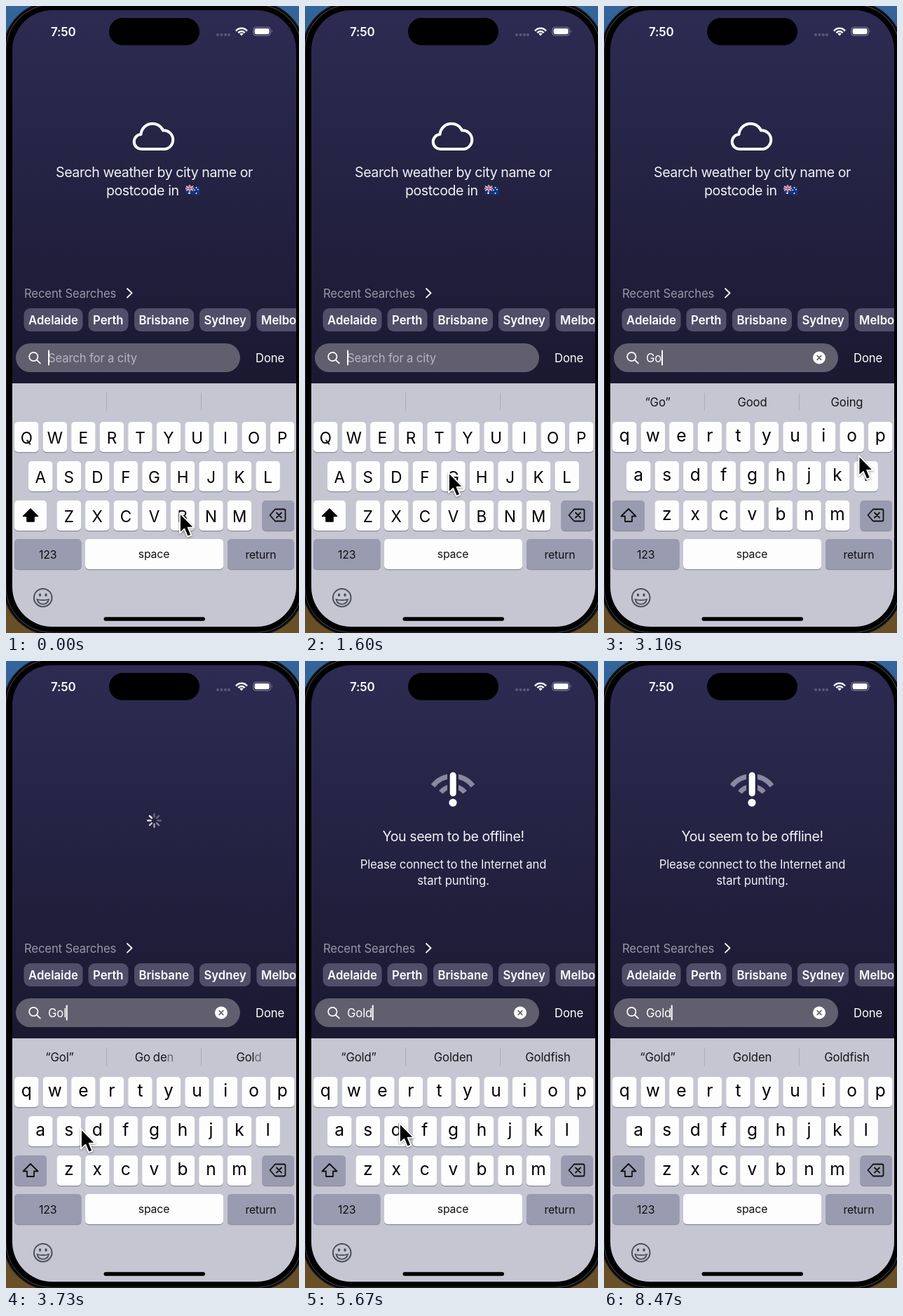
Recreate the animation shown at these times as an HTML page. Size 418 by 894 pixels, loop 8510 ms.

```html
<!DOCTYPE html>
<html lang="en">
<head>
<meta charset="utf-8">
<title>City search</title>
<style>
html, body { margin: 0; width: 100%; height: 100%; overflow: hidden; background: #000; }
svg { display: block; width: 100vw; height: 100vh; }
text { font-family: Inter, Roboto, sans-serif; white-space: pre; }
</style>
</head>
<body>
<svg id="stage" viewBox="0 0 418 894" xmlns="http://www.w3.org/2000/svg"></svg>
<script>
const LOOP = 8510;
const MID = 'text-anchor="middle"';

const rect = (x, y, w, h, r, fill, extra = '') =>
  `<rect x="${x}" y="${y}" width="${w}" height="${h}" rx="${r}" fill="${fill}" ${extra}/>`;
const circle = (x, y, r, fill, extra = '') =>
  `<circle cx="${x}" cy="${y}" r="${r}" fill="${fill}" ${extra}/>`;
const line = (d, color, width, extra = '') =>
  `<path d="${d}" fill="none" stroke="${color}" stroke-width="${width}" stroke-linecap="round" stroke-linejoin="round" ${extra}/>`;
const text = (x, y, str, size, fill, extra = '') =>
  `<text x="${x}" y="${y}" font-size="${size}" fill="${fill}" letter-spacing="${size > 19 ? -.45 : -.15}" ${extra}>${str}</text>`;
const group = (id, body) => `<g id="${id}">${body}</g>`;

// Wi-Fi style arc, 50 degrees to each side of vertical
const arc = (x, y, r, color, width) => {
  const dx = r * .78, dy = r * .63;
  return `<path d="M${x - dx} ${y - dy}A${r} ${r} 0 0 1 ${x + dx} ${y - dy}" fill="none" stroke="${color}" stroke-width="${width}"/>`;
};

const key = (x, y, w, fill = '#fdfdfe') =>
  rect(x, y + 1.2, w, 43, 5, '#8b8d99') + rect(x, y, w, 43, 5, fill);

const ROWS = [['QWERTYUIOP', 12, 593], ['ASDFGHJKL', 32, 649], ['ZXCVBNM', 72.5, 705]];
const eachKey = draw => ROWS.map(([chars, x, y]) =>
  [...chars].map((c, i) => draw(c, x + i * 40.55, y)).join('')).join('');
const label = (c, x, y, size) =>
  `<text x="${x + 17.25}" y="${y}" font-size="${size}" ${MID}>${c}</text>`;

const SHIFT = 'M35 717L24.5 727.5H30V735H40V727.5H45.5Z';

function statusBar() {
  return text(64, 42.5, '7:50', 16.9, '#fff', 'font-weight="600"')
    + rect(147, 17, 129, 39, 19.5, '#000')
    + [302, 307.5, 313, 318].map(x => circle(x, 41, 2, '#5b5975')).join('')
    + arc(336, 42, 10.2, '#fff', 2.6) + arc(336, 42, 6, '#fff', 2.4)
    + '<path d="M336 42.4l-2.7-2.8q2.7-2 5.4 0z" fill="#fff"/>'
    + rect(352.8, 30.3, 24.6, 11.8, 3.8, 'none', 'stroke="#8b89a0"')
    + rect(354.6, 32.1, 21, 8.2, 2.3, '#fff')
    + '<path d="M379 34q1.8 2 0 4.2z" fill="#8b89a0"/>';
}

function flag() {
  return '<g transform="translate(256.5 255)">'
    + '<path d="M0 1.5Q5-.5 10 1.5T20 1.5V14Q15 16 10 14T0 14Z" fill="#17327c"/>'
    + line('M1 2L10 8M10 2L1 8', '#e8e8f2', 1.4) + line('M5.5 1.5V8.5M1 5H10', '#fff', 2.6)
    + line('M5.5 1.5V8.5M1 5H10', '#d03a4c', 1.3)
    + [[5, 11.7, 1.3], [15, 4, .9], [12.6, 7.4, .9], [17.4, 6.7, .9], [15, 12, .9]]
      .map(p => circle(...p, '#fff')).join('') + '</g>';
}

function welcome() {
  return line('M194 204A10.5 10.5 0 0 1 192.5 183A16.5 16.5 0 0 1 224 177.4A13.4 13.4 0 0 1 227 204Z', '#fff', 4)
    + text(211.5, 244, 'Search weather by city name or', 19.6, '#f1f1f5', MID)
    + text(143, 270, 'postcode in', 19.6, '#f1f1f5') + flag();
}

function offline() {
  return arc(211, 201, 36.5, '#8b89a0', 7) + arc(211, 201, 22, '#8b89a0', 7)
    + rect(203, 155, 16, 42, 8, '#272544') + rect(206.7, 158.5, 9, 34.5, 4.5, '#fff')
    + circle(211, 202, 5.6, '#fff')
    + text(211.5, 257, 'You seem to be offline!', 19.6, '#f1f1f5', MID)
    + text(211.5, 296, 'Please connect to the Internet and', 16.7, '#f1f1f5', MID)
    + text(211.5, 318.5, 'start punting.', 16.7, '#f1f1f5', MID);
}

function spinner() {
  return Array.from({ length: 8 }, (_, i) =>
    line('M211.5 222.5V218.2', '#fff', 2.4, `class="spoke" transform="rotate(${i * 45} 211.5 227.5)"`)).join('');
}

function searchArea() {
  const chips = [['Adelaide', 25.5, 84], ['Perth', 117.5, 57], ['Brisbane', 183, 85],
    ['Sydney', 276, 73], ['Melbourne', 357.5, 100]];
  return text(26, 415.5, 'Recent Searches', 16.7, '#9997a7')
    + line('M173 403L179.5 409.3L173 415.6', '#f4f4f8', 1.9)
    + chips.map(([name, x, w]) => rect(x, 431, w, 33, 9, '#504e69')
      + `<text x="${x + 6.5}" y="453.7" font-size="16.7" font-weight="600" fill="#fff">${name}</text>`).join('')
    + rect(14, 481, 320, 41, 20.5, '#615f6e')
    + circle(39.3, 500, 6.2, 'none', 'stroke="#fff" stroke-width="1.7"')
    + line('M44 504.8L48.8 509.4', '#fff', 1.8)
    + text(60, 508, 'Search for a city', 16.7, '#b6b4c0', 'id="hint"')
    + text(60, 508, '', 16.7, '#fff', 'id="query"')
    + rect(0, 490.5, 2, 22, 1, '#fff', 'id="caret"')
    + group('clear', circle(307, 501.5, 9, '#fff') + line('M304.2 498.7L309.8 504.3M309.8 498.7L304.2 504.3', '#615f6e', 1.7))
    + text(356, 508, 'Done', 16.7, '#fff');
}

function keyboard() {
  const dark = '#999bb0';
  return rect(9, 538, 405, 350, 0, '#c5c6d2')
    + line('M143.5 552V577M278.5 552V577', '#abadba', 1)
    + [76.5, 211.5, 346.5].map(x => text(x, 571, '', 16.7, '#15151a', MID + ' class="word"')).join('')
    + eachKey((c, x, y) => key(x, y, 34.5))
    + key(365.5, 705, 45.5, dark) + key(12, 760, 95.5, dark) + key(113, 760, 197, '#fdfdfe') + key(316, 760, 95, dark)
    + group('upper', eachKey((c, x, y) => label(c, x, y + 30.7, 22.5))
      + key(12, 705, 46) + `<path d="${SHIFT}" stroke="#000" stroke-width="1.6" stroke-linejoin="round"/>`)
    + group('lower', eachKey((c, x, y) => label(c.toLowerCase(), x, y + 28, 24.5))
      + key(12, 705, 46, dark) + line(SHIFT, '#111', 1.8))
    + line('M384 717.5H396.5Q398.5 717.5 398.5 719.5V732.5Q398.5 734.5 396.5 734.5H384L376.5 726Z', '#111', 1.8)
    + line('M386 722.5L393 729.5M393 722.5L386 729.5', '#111', 1.8)
    + text(59.7, 787.8, '123', 15.8, '#111', MID) + text(211, 786.6, 'space', 15.8, '#111', MID)
    + text(363.5, 787.6, 'return', 15.8, '#111', MID)
    + circle(52.7, 843.7, 12.8, 'none', 'stroke="#4d4f58" stroke-width="2"')
    + '<path d="M44.5 846Q52.7 848.5 61 846Q59.5 852.8 52.7 852.8T44.5 846Z" fill="none" stroke="#4d4f58" stroke-width="1.8"/>'
    + '<g fill="#4d4f58"><ellipse cx="48.5" cy="839.7" rx="1.7" ry="2.3"/><ellipse cx="57" cy="839.7" rx="1.7" ry="2.3"/></g>'
    + rect(139.5, 871.3, 144.5, 5.4, 2.7, '#000');
}

const stage = document.getElementById('stage');
stage.innerHTML = `<defs>
  <linearGradient id="wall" x2="0" y2="1"><stop stop-color="#34659c"/><stop offset=".5" stop-color="#28384c"/><stop offset="1" stop-color="#6a5026"/></linearGradient>
  <linearGradient id="night" gradientUnits="userSpaceOnUse" x1="0" y1="6" x2="0" y2="538"><stop stop-color="#2d2b52"/><stop offset="1" stop-color="#1b1831"/></linearGradient>
  <clipPath id="screen">${rect(9, 6, 405, 879, 57, '#000')}</clipPath>
</defs>`
  + rect(0, 0, 418, 894, 0, 'url(#wall)')
  + rect(-3, -5, 428, 901, 68, '#000', 'stroke="#17171b" stroke-width="2"')
  + rect(0, -2, 422, 895, 65, 'none', 'stroke="#3a3a40" stroke-width="1.2"')
  + rect(3.5, 1, 415, 889, 62, '#000')
  + '<g clip-path="url(#screen)">' + rect(9, 6, 405, 879, 0, 'url(#night)') + statusBar()
  + group('welcome', welcome()) + group('spinner', spinner()) + group('offline', offline())
  + searchArea() + keyboard() + '</g>'
  + group('mouse', '<path d="M0 0V28.5L6.4 22.6L11 33.6L16.3 31.4L11.7 20.6H20.3Z" stroke="#fff" stroke-width="1.8" stroke-linejoin="round" style="filter:drop-shadow(0 1.5px 1.5px #0006)"/>');

const $ = id => document.getElementById(id);
const words = [...document.querySelectorAll('.word')];
const spokes = [...document.querySelectorAll('.spoke')];
const clamp = v => Math.max(0, Math.min(1, v));
const show = (id, on) => $(id).style.display = on ? '' : 'none';

// time, typed text, caret x, suggestions
const TYPING = [
  [-9999, '', 60, ['', '', '']],
  [2190, 'G', 72.3, ['“G”', '', '']],
  [2760, 'Go', 82, ['“Go”', 'Good', 'Going']],
  [3510, 'Gol', 85.7, ['“Gol”', 'Golden', 'Gold']],
  [4050, 'Gold', 95.7, ['“Gold”', 'Golden', 'Goldfish']]
];
const LOADING = 3600, FAILED = 4500;

// time, x, y of the pointer tip
const PATH = [
  [0, 248, 723], [100, 248, 723], [780, 99, 677], [1050, 99, 677], [1650, 207, 665], [2125, 207, 665],
  [2590, 352, 610], [2880, 352, 610], [3280, 372, 664], [3500, 372, 664], [3730, 107, 667],
  [3950, 133, 660], [4300, 135, 659], [5700, 135, 659], [6030, -40, 705], [LOOP, -40, 705]
];

function pointer(t) {
  const i = PATH.findIndex(p => p[0] > t);
  const [t0, x0, y0] = PATH[i - 1], [t1, x1, y1] = PATH[i];
  const u = (t - t0) / (t1 - t0), s = u * u * (3 - 2 * u);
  return [x0 + (x1 - x0) * s, y0 + (y1 - y0) * s];
}

function caretOpacity(t, since) {
  if (since < 600) return 1;
  const p = (t + (t < 2190 ? 800 : 0)) % 1000 / 1000;
  return p < .4 ? Math.max(clamp((.1 - p) / .2), clamp((p - .2) / .2)) : clamp((1.1 - p) / .2);
}

// Letters not shared with the previous suggestion fade in from left to right
function suggestion(word, before, cell, since, typed) {
  const dt = since + (cell ? 0 : 40), n = word.length;
  let kept = 0;
  while (kept < n && word[kept] === before[kept]) kept++;
  return [...word].map((c, i) => {
    let a = i < kept ? 1 : clamp(.5 + (dt - 220) / 80 + (n - 1 - i) * .5);
    if (cell === 1 && i >= kept && i === typed - 1) a = clamp((dt - 240) / 80);
    return `<tspan fill-opacity="${a}">${c}</tspan>`;
  }).join('');
}

function frame() {
  const t = performance.now() % LOOP;
  const step = TYPING.findLastIndex(s => s[0] <= t);
  const [start, query, caretX, list] = TYPING[step];
  const before = TYPING[Math.max(0, step - 1)][3];
  const since = t - start;

  $('query').textContent = query;
  show('hint', !query);
  show('clear', query);
  show('upper', !query);
  show('lower', query);
  $('caret').setAttribute('x', caretX);
  $('caret').setAttribute('opacity', caretOpacity(t, since));
  words.forEach((w, i) => w.innerHTML = suggestion(list[i], before[i], i, since, query.length));

  show('welcome', t < LOADING);
  show('spinner', t >= LOADING && t < FAILED);
  show('offline', t >= FAILED);
  const lead = Math.floor((t - 3680) / 125) + 7;
  spokes.forEach((s, i) => {
    const lag = ((lead - i) % 8 + 8) % 8;
    s.setAttribute('opacity', Math.max(.3, 1 - lag * .14));
  });

  $('mouse').setAttribute('transform', `translate(${pointer(t)})`);
  requestAnimationFrame(frame);
}
frame();
</script>
</body>
</html>
```
